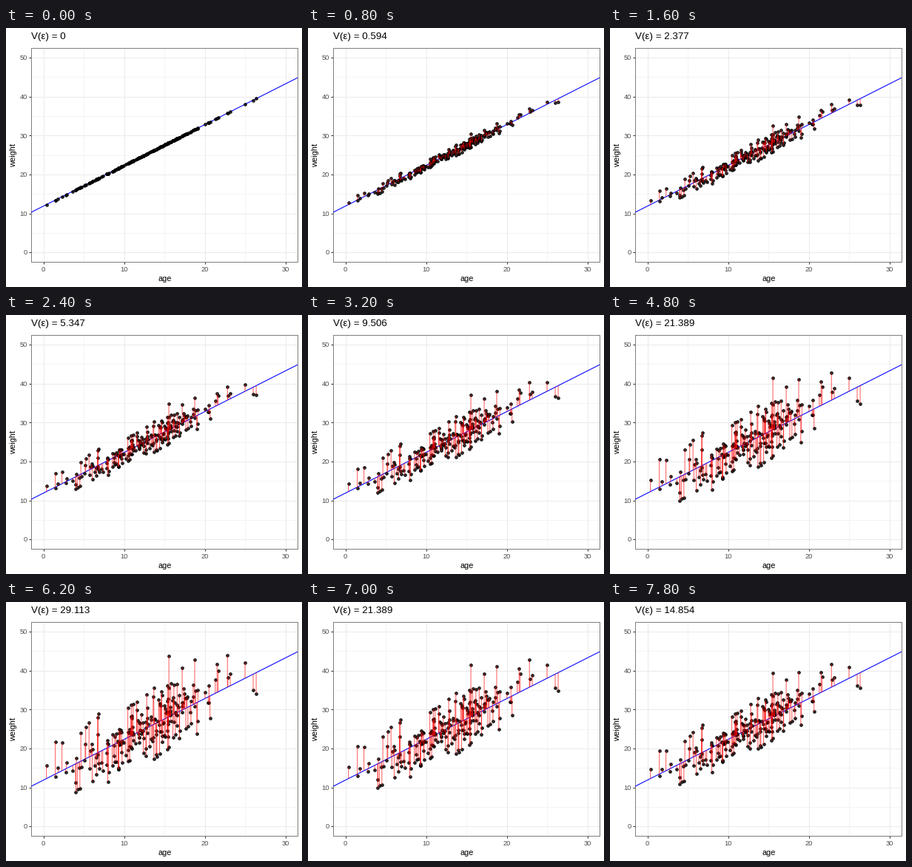
Animation of 400x350 px, one loop 8000 ms. Source, as a matplotlib script:

```python
import numpy as np
import matplotlib.pyplot as plt
from matplotlib.animation import FuncAnimation
from matplotlib.collections import LineCollection

plt.rcParams["font.family"] = "Liberation Sans"

W, H, DPI = 400, 350, 100
LEFT, RIGHT, TOP, BOTTOM = 34.2, 394.4, 27.0, 316.4
XLIM, YLIM = (-1.5, 31.5), (-2.5, 52.5)
FRAMES, STEP_MS = 40, 200
LAST_RISE = 29            # the spread grows up to this step, holds once, then shrinks
VARIANCE = 2.376585       # residual variance at spread 1
INTERCEPT, SLOPE = 11.89, 1.0477
COUNT = 225

# Extreme observations: age and weight at spread 3.5
EXTREMES = [(.37, 15.7), (1.47, 12.8), (2.29, 21.5), (4.21, 9.5),
            (6.78, 28.9), (15.53, 43.8), (17.18, 40.8), (18.73, 42.8),
            (23.13, 39.2), (24.96, 42.1), (25.97, 35.1), (26.34, 34.1)]


def pt(px):
    return px * 72 / DPI


def fit(age):
    return INTERCEPT + SLOPE * age


def make_data():
    rng = np.random.default_rng(12)
    age = rng.normal(12.4, 5, 2 * COUNT)
    err = rng.normal(0, VARIANCE ** .5, 2 * COUNT)
    keep = (age > 1.2) & (age < 23.5) & (abs(err) < 2.7)
    far_age, far_weight = np.array(EXTREMES).T
    far_err = (far_weight - fit(far_age)) / 3.5
    n = COUNT - len(EXTREMES)
    return np.append(age[keep][:n], far_age), np.append(err[keep][:n], far_err)


def spread(i):
    return min(i, 2 * LAST_RISE + 1 - i) / 8


def to_px(v, lim, start, end):
    return start + (v - lim[0]) / (lim[1] - lim[0]) * (end - start)


def text(x, y, s, size, color="black", **kw):
    kw.setdefault("va", "baseline")
    return fig.text(x / W, 1 - y / H, s, fontsize=pt(size), color=color, **kw)


fig = plt.figure(figsize=(W / DPI, H / DPI), dpi=DPI, facecolor="white")
ax = fig.add_axes([LEFT / W, 1 - BOTTOM / H, (RIGHT - LEFT) / W, (BOTTOM - TOP) / H])
ax.set(xlim=XLIM, ylim=YLIM)
ax.set_xticks(range(0, 31, 10))
ax.set_yticks(range(0, 51, 10))
ax.set_xticks(range(5, 30, 10), minor=True)
ax.set_yticks(range(5, 50, 10), minor=True)
ax.set_axisbelow(True)
ax.grid(which="major", color="#ebebeb", lw=pt(1.07))
ax.grid(which="minor", color="#ebebeb", lw=pt(.53))
ax.tick_params(which="major", length=pt(2.75), width=pt(1.07), color="#333333",
               labelbottom=False, labelleft=False)
ax.tick_params(which="minor", length=0)
for spine in ax.spines.values():
    spine.set(color="#7f7f7f", linewidth=pt(1))

for v in range(0, 31, 10):
    text(to_px(v, XLIM, LEFT, RIGHT), 329, str(v), 9.3, "#4d4d4d", ha="center")
for v in range(0, 51, 10):
    text(29.2, to_px(v, YLIM, BOTTOM, TOP) + 3.2, str(v), 9.3, "#4d4d4d", ha="right")
text((LEFT + RIGHT) / 2, 342, "age", 11, ha="center")
text(10.5, (TOP + BOTTOM) / 2, "weight", 11, ha="center", va="center", rotation=90)
title = text(LEFT, 15, "", 13.4)

age, err = make_data()
base = fit(age)
ends = np.array(XLIM)
ax.plot(ends, fit(ends), color="blue", lw=pt(1.07), zorder=3)
dots, = ax.plot([], [], "o", ms=pt(3.9), mew=pt(.71), color="black", alpha=.85, zorder=4)
sticks = LineCollection([], colors="red", linewidths=pt(1.07), alpha=.6, zorder=5)
sticks.set_snap(False)
ax.add_collection(sticks, autolim=False)


def update(i):
    s = spread(i)
    weight = base + s * err
    dots.set_data(age, weight)
    sticks.set_segments([[(a, b), (a, w)] for a, b, w in zip(age, base, weight)])
    title.set_text(f"V(ε) = {round(VARIANCE * s * s, 3):g}")
    return dots, sticks, title


anim = FuncAnimation(fig, update, frames=FRAMES, interval=STEP_MS,
                     repeat=True, repeat_delay=0, blit=False)
plt.show()
```
